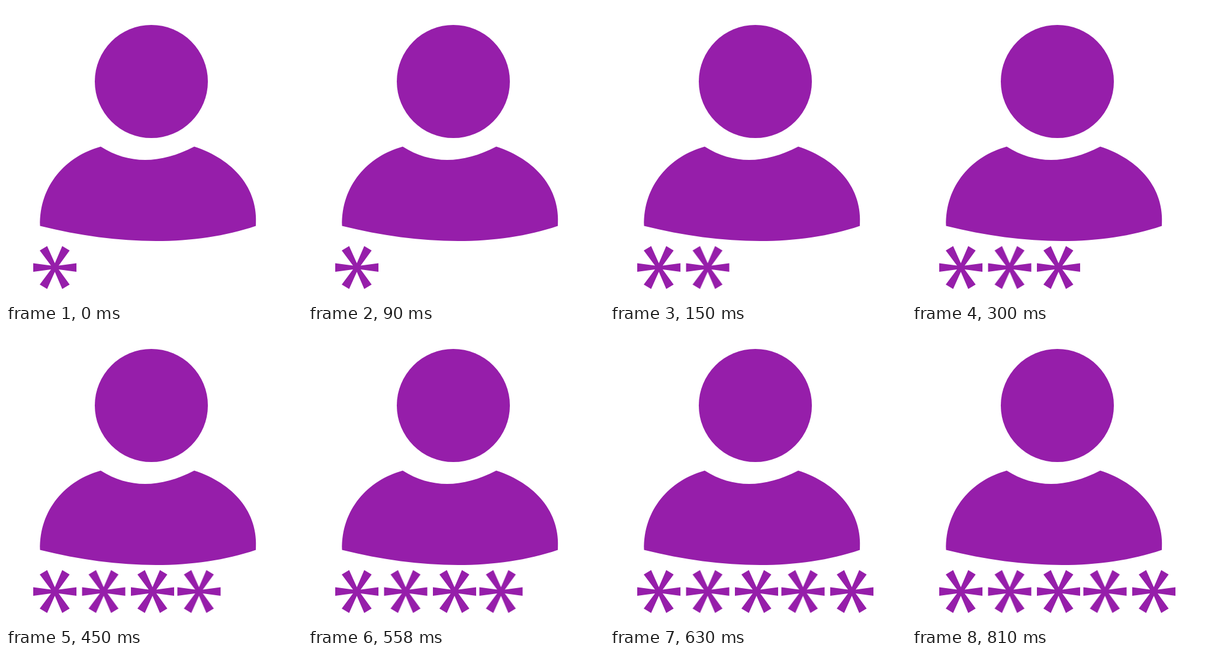
Animation, 500 px wide and 500 px high, one loop 930 ms. Source, as an HTML page:

```html
<!DOCTYPE html>
<html lang="en">
<head>
<meta charset="utf-8">
<title>Password entry</title>
<style>
  html, body { margin: 0; width: 100%; height: 100%; overflow: hidden; background: #fff; }
  svg { display: block; width: 100%; height: 100%; fill: #961eaa; }
</style>
</head>
<body>
<svg viewBox="0 0 500 500">
  <defs>
    <path id="star" d="M46 434.5L76 438.5L57 413L69.5 405.5L82.5 434.5L95 405.5L107.5 413L89 438.5L119 434.5V449L89 445L107.5 470.5L95 478L82.5 449L69.5 478L57 470.5L76 445L46 449Z"/>
  </defs>
  <circle cx="245.5" cy="127.5" r="95.5"/>
  <path d="M57.5 371.5C56 303 101 254 160 237.5C208 268 261 267 318 237.5C384 259 427 308 422 371.5C318 407 187 404 57.5 371.5Z"/>
  <g id="stars"></g>
</svg>
<script>
  const LOOP = 930;
  // horizontal offset and time of appearance in ms
  const steps = [[0, 0], [82.5, 150], [165, 300], [243.5, 450], [326, 630]];
  const group = document.getElementById('stars');

  for (const [x, at] of steps) {
    const star = document.createElementNS('http://www.w3.org/2000/svg', 'use');
    star.setAttribute('href', '#star');
    star.setAttribute('x', x);
    group.append(star);
    if (!at) continue;
    const offset = at / LOOP;
    star.animate([
      { opacity: 0, offset: 0 },
      { opacity: 0, offset },
      { opacity: 1, offset },
      { opacity: 1, offset: 1 }
    ], { duration: LOOP, iterations: Infinity });
  }
</script>
</body>
</html>
```
